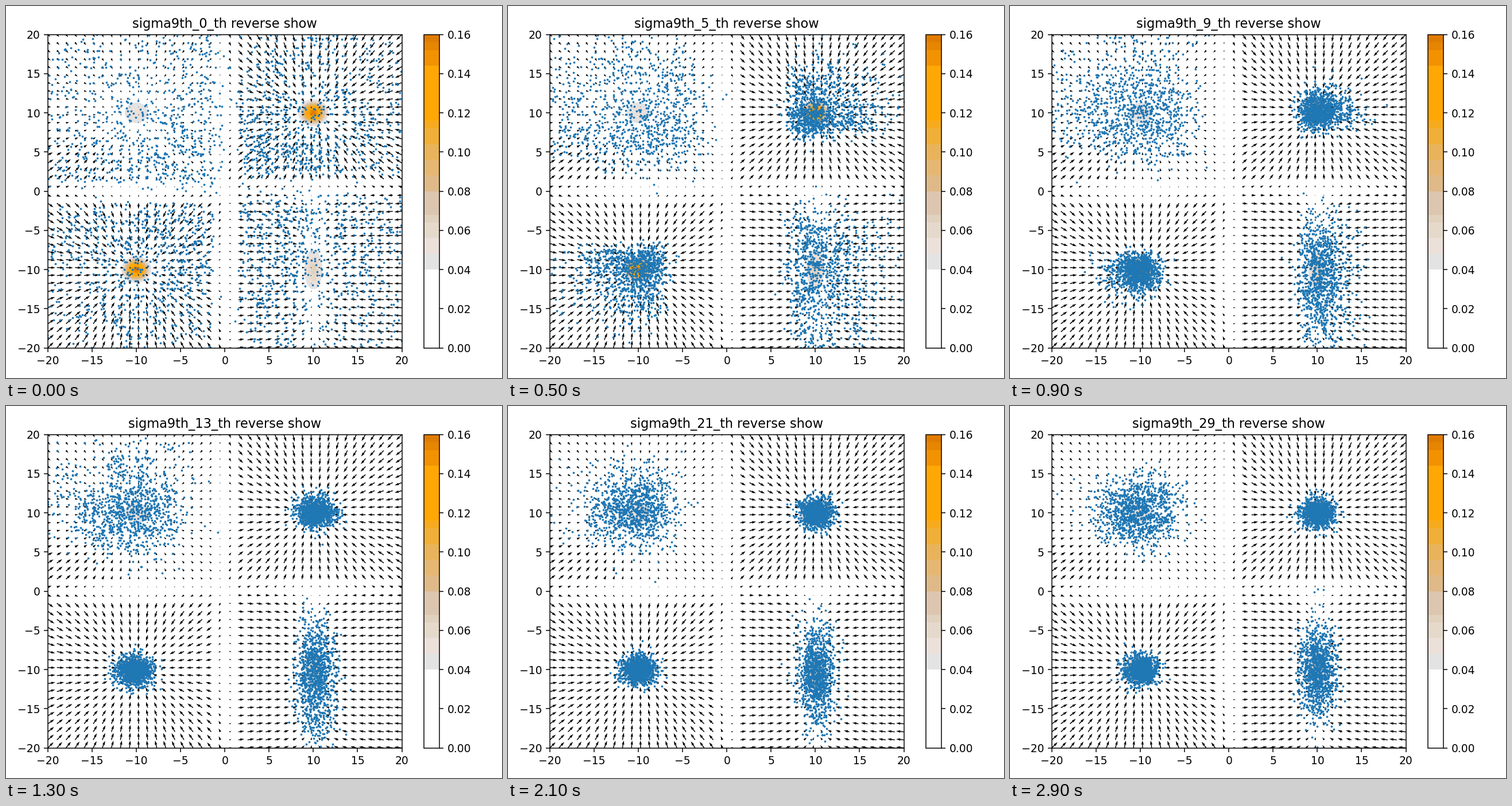
Recreate the animation shown at these times as a matplotlib script. Size 864x648 px, loop 3000 ms.

```python
import numpy as np
import matplotlib.pyplot as plt
from matplotlib.animation import FuncAnimation

W, H, DPI = 864, 648, 135
FRAMES, INTERVAL = 30, 100
COUNT = 4200

# One entry per mode: centre, density widths, cloud widths, decay rates
# for inner and outer particles (x, y), field strength, axis weights.
MODES = [
    dict(c=(10, 10), s=(1, 1), cloud=(0.95, 0.95),
         inner=(0.77, 0.77), outer=(0.82, 0.79), pull=17, weight=(1, 1)),
    dict(c=(-10, -10), s=(1, 1), cloud=(0.95, 0.95),
         inner=(0.77, 0.77), outer=(0.82, 0.80), pull=17, weight=(1, 1)),
    dict(c=(-10, 10), s=(1.75, 1.75), cloud=(2.1, 2.1),
         inner=(0.90, 0.90), outer=(0.93, 0.92), pull=7.5, weight=(1, 1)),
    dict(c=(10, -10), s=(0.98, 2.45), cloud=(1.0, 2.9),
         inner=(0.77, 0.89), outer=(0.82, 0.92), pull=17.5, weight=(1, 1 / 8)),
]

# Colour bands of the density scale: (colour, number of 0.004 steps)
BANDS = [
    ("#ffffff", 10), ("#e3e3e4", 2), ("#ece0da", 2), ("#e5d9cc", 2),
    ("#e1d1bf", 1), ("#dcc6b0", 3), ("#dfba88", 2), ("#e5b773", 2),
    ("#e8b35a", 2), ("#f0af38", 2), ("#f6ab1f", 1), ("#ffa805", 7),
    ("#f39200", 2), ("#e68600", 1), ("#e07c00", 1),
]


def in_mode(mode, x, y):
    cx, cy = mode["c"]
    return ((x >= 0) == (cx > 0)) & ((y >= 0) == (cy > 0))


def density(x, y):
    total = np.zeros_like(x)
    for m in MODES:
        (cx, cy), (sx, sy) = m["c"], m["s"]
        power = ((x - cx) / sx) ** 2 + ((y - cy) / sy) ** 2
        total += np.exp(-power / 2) / (2 * np.pi * sx * sy)
    return total


def field(x, y):
    """Arrow components in pixels, each quadrant pulling to its centre."""
    u, v = np.zeros_like(x), np.zeros_like(y)
    for m in MODES:
        mask = in_mode(m, x, y)
        dx = (m["c"][0] - x) * m["weight"][0]
        dy = (m["c"][1] - y) * m["weight"][1]
        gain = m["pull"] / (np.hypot(dx, dy) + 3)
        u[mask], v[mask] = (dx * gain)[mask], (dy * gain)[mask]
    near_x, near_y = np.tanh(np.abs(x) / 1.2), np.tanh(np.abs(y) / 1.2)
    fade = (0.45 + 0.55 * near_x) * (0.45 + 0.55 * near_y)
    corner = np.exp(-((x + 20) ** 2 / 50 + (y - 1.5) ** 2 / 14))
    boost = 1 + 1.3 * corner * (y > 0)
    return u * near_x * fade * boost, v * near_y * fade * boost


def particle_paths():
    """Positions for all frames: decaying start offset plus settling noise."""
    rng = np.random.default_rng(9)
    start = rng.normal(0, 15, (COUNT, 2))
    centre, cloud, inner, outer = (np.zeros((COUNT, 2)) for _ in range(4))
    for m in MODES:
        mask = in_mode(m, start[:, 0], start[:, 1])
        centre[mask], cloud[mask] = m["c"], m["cloud"]
        inner[mask], outer[mask] = m["inner"], m["outer"]
    offset = start - centre
    rate = np.where(offset * centre > 0, outer, inner)
    noise = rng.normal(size=(COUNT, 2))
    paths = []
    for k in range(FRAMES):
        left = rate ** (k + 0.8)
        paths.append(centre + offset * left + cloud * noise * np.sqrt(1 - left ** 2))
        noise = 0.8 * noise + 0.6 * rng.normal(size=(COUNT, 2))
    return paths


fig, ax = plt.subplots(figsize=(W / DPI, H / DPI), dpi=DPI, facecolor="white")

fine = np.linspace(-20, 20, 240)
gx, gy = np.meshgrid(fine, fine)
levels = np.linspace(0, 0.16, 41)
colors = [c for c, n in BANDS for _ in range(n)]
filled = ax.contourf(gx, gy, density(gx, gy), levels=levels, colors=colors)
fig.colorbar(filled, ax=ax, ticks=np.arange(0, 0.161, 0.02), format="%.2f")

coarse = np.linspace(-20, 20, 40)
qx, qy = np.meshgrid(coarse, coarse)
ax.quiver(qx, qy, *field(qx, qy), scale_units="dots", scale=1)

dots, = ax.plot([], [], "o", color="#1f77b4", ms=2.0, mew=0)
ax.set(xlim=(-20, 20), ylim=(-20, 20))
ax.set_xticks(range(-20, 21, 5))
ax.set_yticks(range(-20, 21, 5))
title = ax.set_title("sigma9th_0_th reverse show")
fig.tight_layout()
paths = particle_paths()


def update(k):
    dots.set_data(paths[k].T)
    title.set_text(f"sigma9th_{k}_th reverse show")
    return dots, title


anim = FuncAnimation(fig, update, frames=FRAMES, interval=INTERVAL,
                     repeat=True, repeat_delay=0, blit=False)
plt.show()
```
